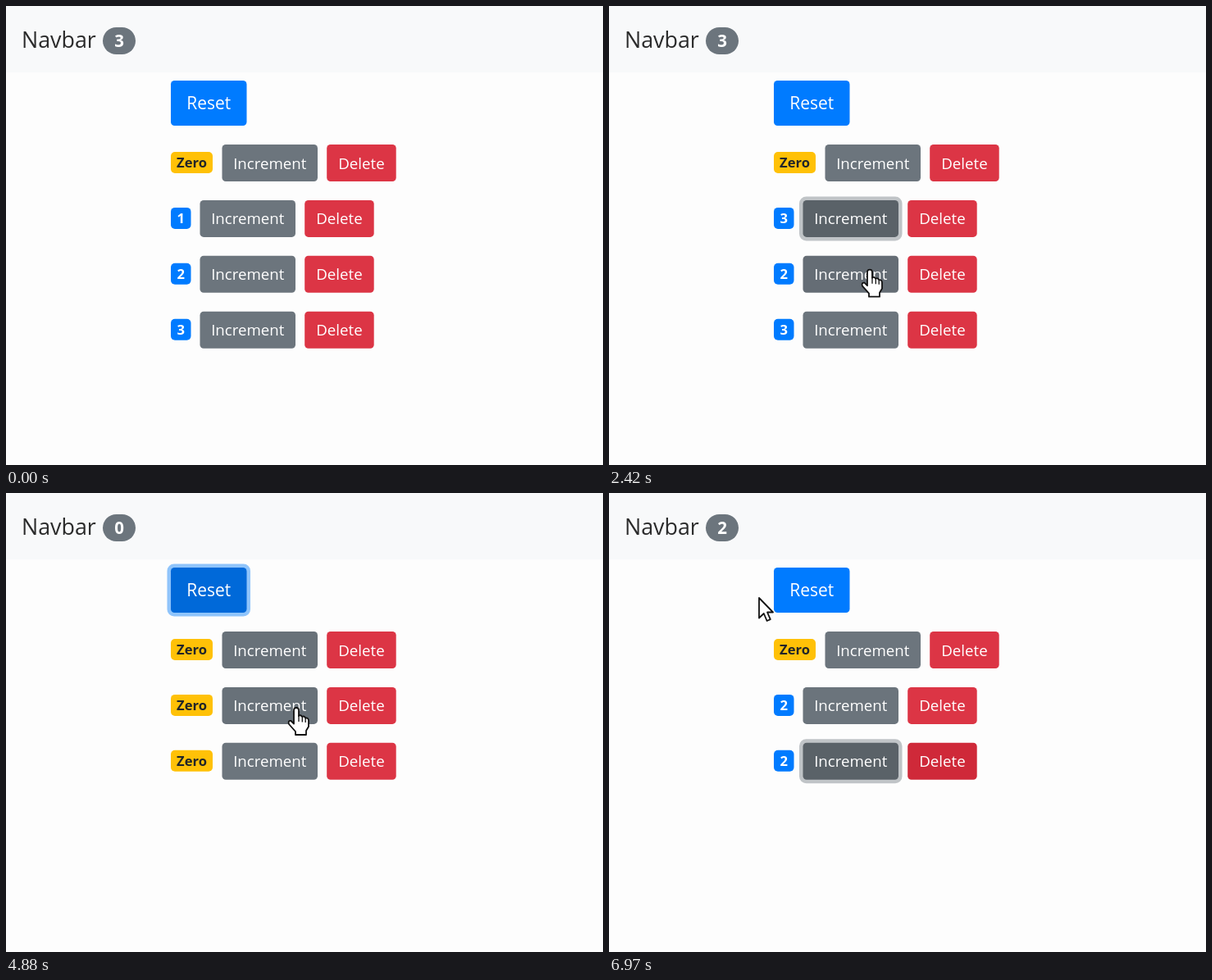
Animation, 728 px wide and 560 px high, one loop 7.01 s. Source, as an HTML page with a canvas:

```html
<!DOCTYPE html>
<html lang="en">
<head>
<meta charset="utf-8">
<title>Counters</title>
<style>
  html, body { margin: 0; width: 100%; height: 100%; overflow: hidden; background: #fdfdfd; }
  canvas { display: block; }
</style>
</head>
<body>
<canvas id="stage" width="728" height="560"></canvas>
<script>
const ctx = document.getElementById('stage').getContext('2d');
const LOOP = 7010, FADE = 150, SAMPLES = 15, PRESS = 90;
const FONT = '"Open Sans", "Noto Sans", sans-serif';

// Each style: normal colour, active colour, focus ring
const GRAY = ['#6c757d', '#5a6268', '#c0c4c7'];
const RED = ['#dc3545', '#c82333', '#edaab1'];
const BLUE = ['#007bff', '#0069d9', '#8fc4fb'];
const BADGE = ['#ffc107', '#007bff'];
const BADGE_TEXT = ['#212529', '#ffffff'];

// Clicks in order: time, button id
const clicks = [
  [1640, 'inc1'], [1900, 'inc1'], [2650, 'inc2'], [3400, 'del2'], [4300, 'reset'],
  [5250, 'inc1'], [5560, 'inc1'], [6155, 'inc3'], [6450, 'inc3']
];

// Pointer stops: arrival time, x, y, length of the glide there
const stops = [
  [450, 600, 580, 0], [760, 536, 412, 310], [1450, 314, 238, 600], [2430, 318, 322, 250],
  [3140, 418, 334, 350], [4000, 291, 132, 450], [4880, 354, 262, 100],
  [6000, 351, 314, 250], [6720, 384, 322, 200], [6966, 183, 128, 55]
];

function pointer(t) {
  if (t < stops[0][0]) return null;
  let [, x, y] = stops[0];
  for (const [end, tx, ty, len] of stops.slice(1)) {
    const u = Math.min(1, Math.max(0, (t - end + len) / len));
    const e = u * u * (3 - 2 * u);
    x += (tx - x) * e;
    y += (ty - y) * e;
  }
  return { x, y };
}

// Replays the clicks made so far on counters 0 to 3
function rowsAt(t) {
  let rows = [0, 1, 2, 3].map(n => ({ key: n, value: n }));
  for (const [time, id] of clicks) {
    if (time > t) break;
    const key = +id.slice(3);
    if (id === 'reset') rows.forEach(r => { r.value = 0; });
    else if (id.startsWith('del')) rows = rows.filter(r => r.key !== key);
    else rows.find(r => r.key === key).value++;
  }
  return rows;
}

function layout(rows) {
  const list = [{ id: 'reset', label: 'Reset', x: 201, y: 91, w: 92.5, h: 55, style: BLUE, size: 21 }];
  rows.forEach((r, i) => {
    const x = r.value ? 236.5 : 263.5;
    const base = { y: 169 + 67.9 * i, h: 45, size: 18.7 };
    list.push(
      { ...base, id: 'inc' + r.key, label: 'Increment', x, w: 116.5, style: GRAY },
      { ...base, id: 'del' + r.key, label: 'Delete', x: x + 127.7, w: 84.5, style: RED }
    );
  });
  return list;
}

const inside = (b, p) => p && p.x >= b.x && p.x <= b.x + b.w && p.y >= b.y && p.y <= b.y + b.h;

function sceneAt(t) {
  const rows = rowsAt(t), buttons = layout(rows), p = pointer(t);
  const pressed = clicks.filter(c => c[0] - PRESS <= t).pop();
  const over = buttons.find(b => inside(b, p));
  return { rows, buttons, p, focus: pressed && pressed[1], hover: over && over.id };
}

const hex = (c, i) => parseInt(c.substr(1 + 2 * i, 2), 16);
const mix = ([a, b], k) => `rgb(${[0, 1, 2].map(i => Math.round(hex(a, i) + (hex(b, i) - hex(a, i)) * k))})`;

function box(x, y, w, h, r, fill) {
  ctx.fillStyle = fill;
  ctx.beginPath();
  ctx.roundRect(x, y, w, h, r);
  ctx.fill();
}

function text(str, x, y, size, color, weight = 400, align = 'center') {
  ctx.font = `${weight} ${size}px ${FONT}`;
  ctx.textAlign = align;
  ctx.fillStyle = color;
  ctx.fillText(str, x, y);
}

function drawButton(b, level) {
  const ring = level(s => s.focus === b.id);
  const dark = level(s => s.focus === b.id || s.hover === b.id);
  const g = 4.5 * ring;
  if (ring) box(b.x - g, b.y - g, b.w + 2 * g, b.h + 2 * g, 4 + g, mix(['#fdfdfd', b.style[2]], ring));
  box(b.x, b.y, b.w, b.h, 4.5, mix(b.style, dark));
  text(b.label, b.x + b.w / 2, b.y + b.h / 2 + b.size * 0.375, b.size, '#fff');
}

function drawBadge(row, i, level) {
  const y = 178 + 67.9 * i, w = row.value ? 24.5 : 51;
  const k = level(s => s.rows.some(r => r.key === row.key && r.value > 0));
  box(201, y, w, 26, 5, mix(BADGE, k));
  text(row.value || 'Zero', 201 + w / 2, y + 19.3, 16.6, mix(BADGE_TEXT, k), 700);
}

const arrow = new Path2D('M0 0V24.5L5.8 19L9.6 28L13.8 26.2L10 17.5H17Z');
const hand = new Path2D('M-3 3Q-3 0 0 0Q3 0 3 3V10Q5 8 7.3 11Q9.5 9.5 11.2 12.5Q15 12 15 16V23L12 28V33H-1V29L-9 20Q-10.5 15.5-6.5 16L-3 19.5Z');
const knuckles = new Path2D('M3 9V17M7.3 11V17.5M11.2 12.5V18');

function drawPointer(p, over) {
  ctx.save();
  ctx.translate(p.x, p.y);
  ctx.lineJoin = 'round';
  ctx.lineWidth = 1.8;
  ctx.strokeStyle = '#111';
  ctx.fillStyle = '#fff';
  const shape = over ? hand : arrow;
  ctx.fill(shape);
  ctx.stroke(shape);
  ctx.lineWidth = 1.3;
  if (over) ctx.stroke(knuckles);
  ctx.restore();
}

function draw(t) {
  const { rows, buttons, p, hover } = sceneAt(t);
  const recent = Array.from({ length: SAMPLES }, (_, k) => sceneAt(Math.max(0, t - (k + 0.5) * FADE / SAMPLES)));
  // Share of the last FADE ms during which a condition held
  const level = test => recent.filter(test).length / SAMPLES;

  ctx.fillStyle = '#fdfdfd';
  ctx.fillRect(0, 0, 728, 560);
  ctx.fillStyle = '#f8f9fa';
  ctx.fillRect(0, 0, 728, 81);
  text('Navbar', 19, 50.5, 26.8, '#2b2b2b', 400, 'left');
  box(118, 26, 40, 33, 16.5, GRAY[0]);
  text(rows.filter(r => r.value > 0).length, 138, 50, 20.5, '#fff', 700);
  buttons.forEach(b => drawButton(b, level));
  rows.forEach((r, i) => drawBadge(r, i, level));
  if (p) drawPointer(p, hover);
}

const begin = performance.now();
function tick() {
  draw((performance.now() - begin) % LOOP);
  requestAnimationFrame(tick);
}
tick();
</script>
</body>
</html>
```
